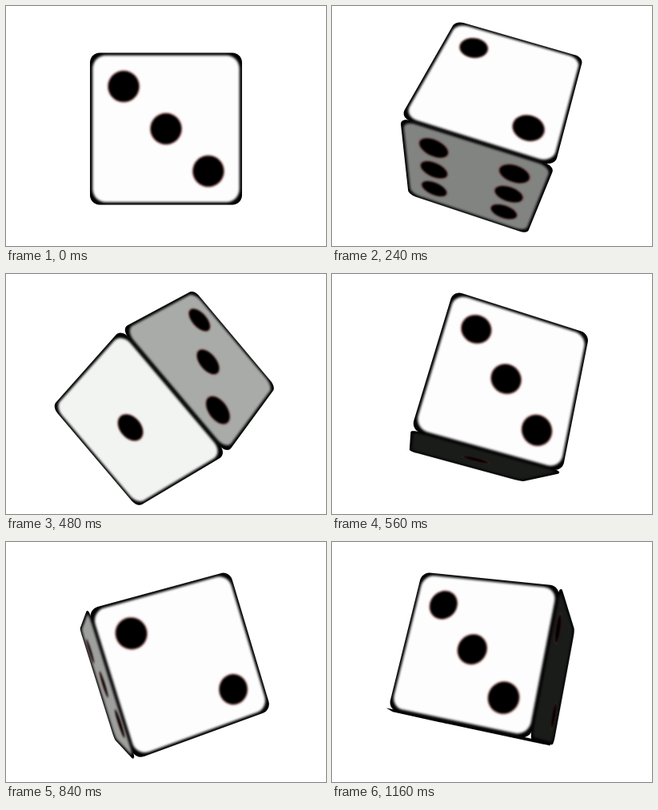
An HTML page with a canvas that plays this animation: 400 by 300 pixels, repeating every 1.2 s.

```html
<!DOCTYPE html>
<html lang="en">
<head>
<meta charset="utf-8">
<title>Rolling die</title>
<style>
  html, body { margin: 0; width: 100%; height: 100%; overflow: hidden; background: #fff; }
  canvas { display: block; }
</style>
</head>
<body>
<canvas id="stage" width="400" height="300"></canvas>
<script>
const ctx = document.getElementById('stage').getContext('2d');
const LOOP = 1200, STEP = 40;
const HALF = 81, CAMERA = 540, CX = 200, CY = 153.5, SPACING = 45;
const LIGHT = [-0.52, -0.45, 1.17];
const { PI, sin, cos, sign, SQRT1_2 } = Math;

// Pips of a face as cells -1..1; tilt picks the diagonal that fills first
function pipsOf(value) {
  const tilt = value % 2 ? 1 : -1;
  const pips = value % 2 ? [[0, 0]] : [];
  if (value > 1) pips.push([-1, -tilt], [1, tilt]);
  if (value > 3) pips.push([-1, tilt], [1, -tilt]);
  if (value > 5) pips.push([-1, 0], [1, 0]);
  return pips;
}

// 2 lies on +x, 1 on +y (down), 3 on +z (viewer); opposite sides add up to 7
const faces = [2, 1, 3].flatMap((value, axis) => [
  { axis, side: 1, pips: pipsOf(value) },
  { axis, side: -1, pips: pipsOf(7 - value) }
]);

// First half: one full roll about the x-z diagonal with a slight sway.
// Second half: swing aside about y and come back, rocking on the diagonal.
function poseAt(t) {
  const s = t / (LOOP / 2) % 1;
  const wave = sin(2 * PI * s);
  const [roll, swing] = t < LOOP / 2
    ? [360 * s - 6 * wave, 22 * wave]
    : [360 + 37 * wave, 79 * sin(PI * s)];
  const a = roll * PI / 360, b = swing * PI / 360;
  const d = -cos(b) * sin(a) * SQRT1_2;
  return [cos(b) * cos(a), d, sin(b), d];
}

function matrix([w, x, y, z]) {
  return [
    [1 - 2 * (y * y + z * z), 2 * (x * y - w * z), 2 * (x * z + w * y)],
    [2 * (x * y + w * z), 1 - 2 * (x * x + z * z), 2 * (y * z - w * x)],
    [2 * (x * z - w * y), 2 * (y * z + w * x), 1 - 2 * (x * x + y * y)]
  ];
}

function project(m, { axis, side }, u, v) {
  const p = [];
  p[axis] = HALF * side;
  p[(axis + 1) % 3] = u;
  p[(axis + 2) % 3] = v;
  const [x, y, z] = m.map(row => row[0] * p[0] + row[1] * p[1] + row[2] * p[2]);
  const k = CAMERA / (CAMERA - z);
  return [CX + x * k, CY + y * k];
}

// Rounded square on a face; a circle when radius equals half
function fillShape(m, face, u, v, half, radius, color) {
  ctx.beginPath();
  for (let k = 0; k < 4; k++) {
    const mid = (k + 0.5) * PI / 2;
    const cu = u + sign(cos(mid)) * (half - radius);
    const cv = v + sign(sin(mid)) * (half - radius);
    for (let j = 0; j <= 8; j++) {
      const a = (k + j / 8) * PI / 2;
      ctx.lineTo(...project(m, face, cu + radius * cos(a), cv + radius * sin(a)));
    }
  }
  ctx.closePath();
  ctx.fillStyle = color;
  ctx.fill();
}

function drawBody(m, face) {
  fillShape(m, face, 0, 0, 79.5, 9, '#000');
  ctx.strokeStyle = '#000';
  ctx.lineWidth = 3;
  ctx.stroke();
}

function drawFace(m, face) {
  const lit = LIGHT.reduce((sum, l, i) => sum + l * m[i][face.axis] * face.side, 0);
  const v = Math.round(252 * Math.min(1, Math.max(0.1, lit)));
  ctx.filter = 'blur(1.5px)';
  fillShape(m, face, 0, 0, 78, 14, `rgb(${v},${Math.min(253, v + 3)},${v})`);
  ctx.filter = 'blur(0.8px)';
  for (const [a, b] of face.pips) {
    fillShape(m, face, a * SPACING, b * SPACING, 17.5, 17.5, 'rgba(150,60,60,0.5)');
    fillShape(m, face, a * SPACING, b * SPACING, 16.2, 16.2, '#000');
  }
  ctx.filter = 'none';
}

function draw(now) {
  const t = Math.floor(now % LOOP / STEP) * STEP;
  const m = matrix(poseAt(t));
  const visible = faces.filter(({ axis, side }) => m[2][axis] * side > HALF / CAMERA);
  ctx.fillStyle = '#fff';
  ctx.fillRect(0, 0, 400, 300);
  visible.forEach(face => drawBody(m, face));
  visible.forEach(face => drawFace(m, face));
}

let start;
function tick(now) {
  start ??= now;
  draw(now - start);
  requestAnimationFrame(tick);
}
requestAnimationFrame(tick);
</script>
</body>
</html>
```
